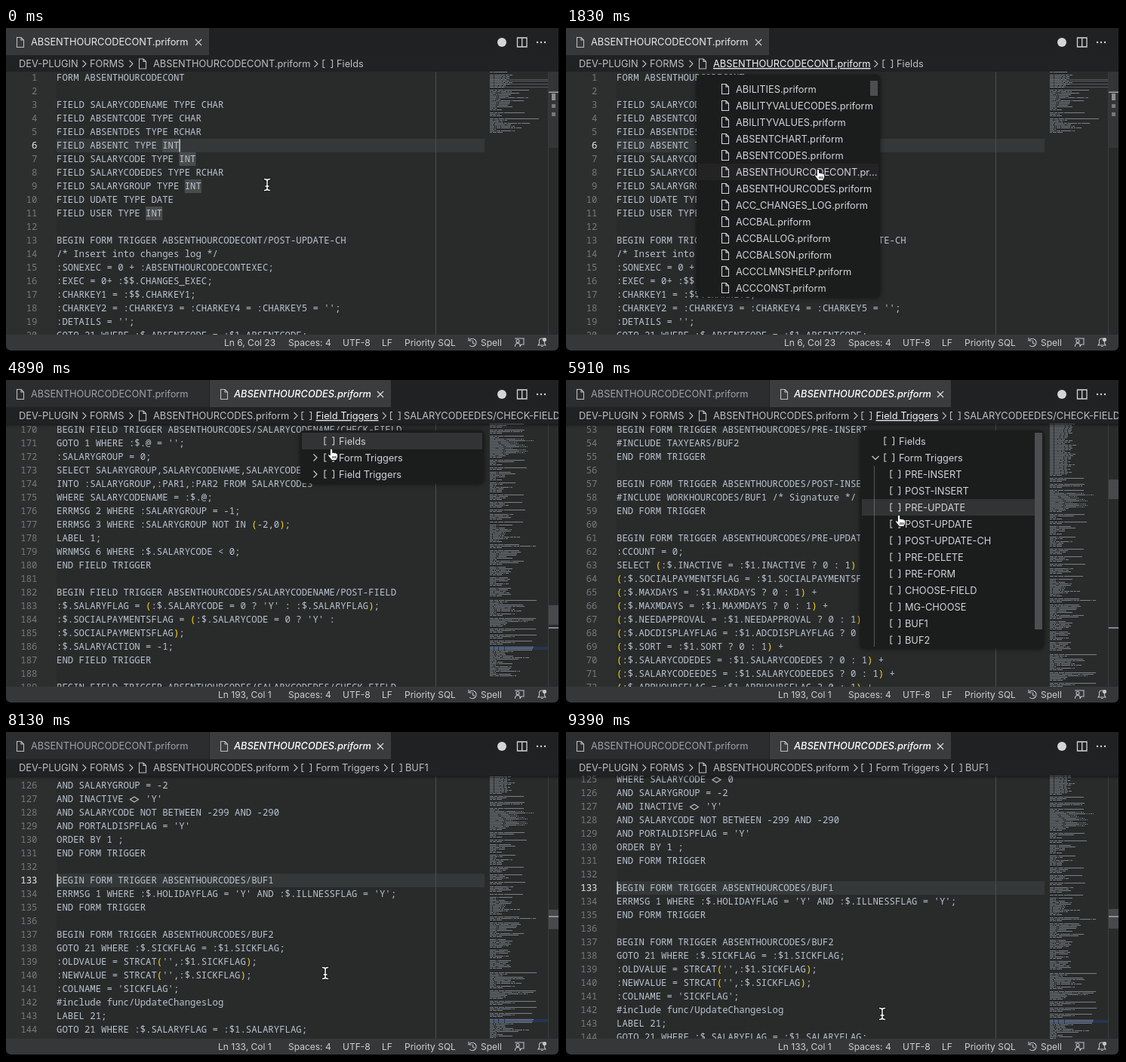
Write an HTML page that moves like this. It is 734x430 px and loops after 9420 ms.

```html
<!DOCTYPE html>
<html lang="en">
<head>
<meta charset="utf-8">
<title>Editor breadcrumbs</title>
<style>
html, body { margin: 0; width: 734px; height: 430px; overflow: hidden; background: #050606; }
svg { display: block; }
text { white-space: pre; }
.ui text { font-family: Inter, Roboto, sans-serif; font-size: 12.8px; fill: #bcbfc2; }
.ui .status text { font-size: 12px; fill: #cdd0d2; }
.ui .menu text { fill: #d2d4d6; }
.code text { font-family: "Noto Sans Mono", "DejaVu Sans Mono", monospace; font-size: 12.3px; font-weight: 500; fill: #b9c3d0; }
.code .num { font-weight: 400; fill: #757a7d; text-anchor: end; }
.code .on { fill: #d8dbdc; }
.line { fill: none; stroke: #bcbfc2; stroke-width: 1.1; }
.menu .line { stroke: #d2d4d6; }
</style>
</head>
<body>
<svg id="stage" width="734" height="430" viewBox="0 0 734 430" xmlns="http://www.w3.org/2000/svg"></svg>
<script>
const LOOP = 9420, CHAR = 7.38, ROW = 18, LEFT = 67;
const OPEN_FILES = 1150, OPEN_B = 2350, OPEN_SYMBOLS = 3750, EXPAND = 5250, PICK = 7000;

// ---------- documents ----------
const block = s => s.trim().split('\n');
const docA = block(`
FORM ABSENTHOURCODECONT

FIELD SALARYCODENAME TYPE CHAR
FIELD ABSENTCODE TYPE CHAR
FIELD ABSENTDES TYPE RCHAR
FIELD ABSENTC TYPE INT
FIELD SALARYCODE TYPE INT
FIELD SALARYCODEDES TYPE RCHAR
FIELD SALARYGROUP TYPE INT
FIELD UDATE TYPE DATE
FIELD USER TYPE INT

BEGIN FORM TRIGGER ABSENTHOURCODECONT/POST-UPDATE-CH
/* Insert into changes log */
:SONEXEC = 0 + :ABSENTHOURCODECONTEXEC;
:EXEC = 0+ :$$.CHANGES_EXEC;
:CHARKEY1 = :$$.CHARKEY1;
:CHARKEY2 = :CHARKEY3 = :CHARKEY4 = :CHARKEY5 = '';
:DETAILS = '';
GOTO 21 WHERE :$.ABSENTCODE = :$1.ABSENTCODE;
:OLDVALUE = :$1.ABSENTCODE;
:NEWVALUE = :$.ABSENTCODE;
:COLNAME = 'ABSENTCODE';
#include func/UpdateChangesLog
LABEL 21;
END FORM TRIGGER

BEGIN FORM TRIGGER ABSENTHOURCODECONT/PRE-FORM
:SONEXEC = 0;
END FORM TRIGGER

BEGIN FIELD TRIGGER ABSENTHOURCODECONT/SALARYCODENAME/CHECK-FIELD
GOTO 1 WHERE :$.@ = '';
:SALARYGROUP = 0;
SELECT SALARYGROUP INTO :SALARYGROUP FROM SALARYCODES
WHERE SALARYCODENAME = :$.@;
ERRMSG 2 WHERE :SALARYGROUP = -1;
ERRMSG 3 WHERE :SALARYGROUP NOT IN (-2,0);
LABEL 1;
WRNMSG 6 WHERE :$.SALARYCODE < 0;
END FIELD TRIGGER`);

const compareFields = ['SOCIALPAYMENTSFLAG', 'MAXDAYS', 'MAXMDAYS', 'NEEDAPPROVAL', 'ADCDISPLAYFLAG',
  'SORT', 'SALARYCODEDES', 'SALARYCODEEDES', 'APPHOURSFLAG'];
const triggers = ['PRE-INSERT', 'POST-INSERT', 'PRE-UPDATE', 'POST-UPDATE', 'POST-UPDATE-CH', 'PRE-DELETE',
  'PRE-FORM', 'CHOOSE-FIELD', 'MG-CHOOSE', 'BUF1', 'BUF2'];
const triggerLine = [53, 57, 61, 77, 82, 100, 105, 110, 118, 133, 137];

function makeDocB() {
  let seed = 7;
  const rand = n => (seed = seed * 16807 % 2147483647) % n;
  const doc = ['FORM ABSENTHOURCODES', ''];
  const put = (n, s) => block(s).forEach((l, i) => doc[n - 1 + i] = l);
  const any = () => compareFields[rand(compareFields.length)];
  for (let n = 3; n <= 50; n++) put(n, `FIELD ${any()} TYPE ${['INT', 'CHAR', 'RCHAR'][rand(3)]}`);
  for (let n = 51; n <= 226; n++) {
    const f = any();
    put(n, [`:NEWVALUE = :$.${f};`, `WHERE ${f} = :$.@`, `GOTO ${rand(30)} WHERE :$.${f} = 0;`,
      `:COLNAME = '${f}';`, 'LABEL 1;'][rand(5)]);
  }
  for (let n = 69; n <= 222; n += 7) { put(n, 'END FORM TRIGGER'); doc[n] = ''; }
  put(51, 'END FORM TRIGGER');
  triggers.forEach((name, i) => {
    const n = triggerLine[i];
    put(n - 2, 'END FORM TRIGGER');
    doc[n - 2] = '';
    put(n, 'BEGIN FORM TRIGGER ABSENTHOURCODES/' + name);
  });
  put(54, '#INCLUDE TAXYEARS/BUF2\nEND FORM TRIGGER');
  put(58, '#INCLUDE WORKHOURCODES/BUF1 /* Signature */\nEND FORM TRIGGER');
  put(62, ':CCOUNT = 0;\nSELECT (:$.INACTIVE = :$1.INACTIVE ? 0 : 1) +\n' +
    compareFields.map(f => `(:$.${f} = :$1.${f} ? 0 : 1) +`).join('\n'));
  put(125, `
WHERE SALARYCODE <> 0
AND SALARYGROUP = -2
AND INACTIVE <> 'Y'
AND SALARYCODE NOT BETWEEN -299 AND -290
AND PORTALDISPFLAG = 'Y'
ORDER BY 1 ;
END FORM TRIGGER

BEGIN FORM TRIGGER ABSENTHOURCODES/BUF1
ERRMSG 1 WHERE :$.HOLIDAYFLAG = 'Y' AND :$.ILLNESSFLAG = 'Y';
END FORM TRIGGER

BEGIN FORM TRIGGER ABSENTHOURCODES/BUF2
GOTO 21 WHERE :$.SICKFLAG = :$1.SICKFLAG;
:OLDVALUE = STRCAT('',:$1.SICKFLAG);
:NEWVALUE = STRCAT('',:$.SICKFLAG);
:COLNAME = 'SICKFLAG';
#include func/UpdateChangesLog
LABEL 21;
GOTO 21 WHERE :$.SALARYFLAG = :$1.SALARYFLAG;
:OLDVALUE = STRCAT('',:$1.SALARYFLAG);`);
  doc[168] = '';
  put(170, `
BEGIN FIELD TRIGGER ABSENTHOURCODES/SALARYCODENAME/CHECK-FIELD
GOTO 1 WHERE :$.@ = '';
:SALARYGROUP = 0;
SELECT SALARYGROUP,SALARYCODENAME,SALARYCODE
INTO :SALARYGROUP,:PAR1,:PAR2 FROM SALARYCODES
WHERE SALARYCODENAME = :$.@;
ERRMSG 2 WHERE :SALARYGROUP = -1;
ERRMSG 3 WHERE :SALARYGROUP NOT IN (-2,0);
LABEL 1;
WRNMSG 6 WHERE :$.SALARYCODE < 0;
END FIELD TRIGGER

BEGIN FIELD TRIGGER ABSENTHOURCODES/SALARYCODENAME/POST-FIELD
:$.SALARYFLAG = (:$.SALARYCODE = 0 ? 'Y' : :$.SALARYFLAG);
:$.SOCIALPAYMENTSFLAG = (:$.SALARYCODE = 0 ? 'Y' :
:$.SOCIALPAYMENTSFLAG);
:$.SALARYACTION = -1;
END FIELD TRIGGER

BEGIN FIELD TRIGGER ABSENTHOURCODES/SALARYCODEDES/CHECK-FIELD
WRNMSG 6 WHERE :$.SALARYCODE < 0;
END FIELD TRIGGER

BEGIN FIELD TRIGGER ABSENTHOURCODES/SALARYCODEEDES/CHECK-FIELD
WRNMSG 6 WHERE :$.SALARYCODE < 0;
END FIELD TRIGGER

BEGIN FIELD TRIGGER ABSENTHOURCODES/SICKFLAG/CHECK-FIELD
ERRMSG 5 WHERE :$.SALARYCODE < 0;
END FIELD TRIGGER

BEGIN FIELD TRIGGER ABSENTHOURCODES/SALARYFLAG/CHECK-FIELD`);
  put(205, 'BEGIN FIELD TRIGGER ABSENTHOURCODES/SALARYFLAG/POST-FIELD');
  put(209, `
BEGIN FIELD TRIGGER ABSENTHOURCODES/TASKCODE/CHECK-FIELD
GOTO 11 WHERE :$.TASKCODE = '';
:PAR1 = :$.TASKCODE;
ERRMSG 7 WHERE EXISTS
(SELECT 'X' FROM WORKHOURSTASKS
WHERE TASKCODE = :$.TASKCODE AND ABSENTFLAG <> 'Y');
#INCLUDE ABSENTHOURCODES/TASKCODE/BUF1
LABEL 11;
END FIELD TRIGGER`);
  return doc;
}
const docB = makeDocB();
const FOLDS = [201, 205];
const hidden = n => FOLDS.some(f => n > f && n < f + 4);

// ---------- drawing helpers ----------
const esc = s => s.replace(/&/g, '&amp;').replace(/</g, '&lt;');
const rect = (x, y, w, h, fill, extra = '') => `<rect x="${x}" y="${y}" width="${w}" height="${h}" fill="${fill}" ${extra}/>`;
const line = (d, extra = '') => `<path class="line" d="${d}" ${extra}/>`;
const label = (x, cy, s, extra = '') => `<text x="${x}" y="${cy + 4.6}" ${extra}>${esc(s)}</text>`;
const fileIcon = (x, cy) => line(`M${x + 1.5} ${cy - 6.5}h5.5l3.5 3.5v9.5h-9zM${x + 7} ${cy - 6.5}v3.5h3.5`);
const brackets = (x, cy) => line(`M${x + 3.5} ${cy - 5}h-2.5v10h2.5M${x + 11} ${cy - 5}h2.5v10h-2.5`);
const chevron = (x, cy) => line(`M${x - 2.5} ${cy - 4.5}l4.5 4.5-4.5 4.5`);
const cross = (x, cy, c) => line(`M${x - 4} ${cy - 4}l8 8m0-8l-8 8`, `style="stroke:${c}"`);
const group = (id, body, extra = '') => `<g id="${id}" ${extra}>${body}</g>`;

function codeLines(doc, folds) {
  let row = 0, out = '';
  doc.forEach((s, i) => {
    const n = i + 1;
    if (folds && hidden(n)) return;
    const cy = 66 + ROW * row++, y = cy + 4.4;
    if (folds && FOLDS.includes(n)) {
      const end = LEFT + s.length * CHAR + 2;
      out += rect(LEFT, cy - 9, 567, ROW, '#222b41') + chevron(56, cy) +
        line(`M${end} ${cy}h8`, 'stroke-dasharray="1.6 1.4"');
    }
    const at = s.indexOf('<>');
    if (at >= 0) out += line(`M${LEFT + at * CHAR + 1.5} ${cy + .5}l5.5-3.5 5.5 3.5-5.5 3.5z`);
    const body = esc(s.replace('<>', '  ')).replace(/[()]/g, '<tspan fill="#ffd80a">$&</tspan>');
    out += `<text class="num" x="41.5" y="${y}">${n}</text><text x="${LEFT}" y="${y}">${body}</text>`;
  });
  return out;
}

function miniMap(doc, folds) {
  let row = 0, d = '', blue = '';
  doc.forEach((s, i) => {
    if (folds && hidden(i + 1)) return;
    const y = 58.5 + 2 * row++;
    if (folds && FOLDS.includes(i + 1)) blue += rect(641, y - .5, 77, 2, '#243555');
    for (const m of s.matchAll(/\S+/g)) d += `M${641 + m.index} ${y}h${m[0].length}`;
  });
  return blue + `<path d="${d}" stroke="#acb5c0" stroke-width="1.1" opacity=".62"/>`;
}

function menu(id, x, y, w, h, rows, thumb) {
  return group(id, rect(x, y, w, h, '#1b1c1c', 'rx="5" filter="url(#shadow)"') +
    rect(x + 2, 70, w - 4, 22, '#313334', `id="${id}Hover"`) + rows +
    (thumb ? rect(...thumb, '#4c4e50') : ''), 'class="menu"');
}

const files = ['ABILITIES', 'ABILITYVALUECODES', 'ABILITYVALUES', 'ABSENTCHART', 'ABSENTCODES', 'ABSENTHOURCODECONT',
  'ABSENTHOURCODES', 'ACC_CHANGES_LOG', 'ACCBAL', 'ACCBALLOG', 'ACCBALSON', 'ACCCLMNSHELP', 'ACCCONST'];
const fileRows = files.map((f, i) => fileIcon(205, 81 + 22 * i) +
  label(225, 81 + 22 * i, f + (i == 5 ? '.pr...' : '.priform'))).join('');
const node = (x, cy, s) => brackets(x, cy) + label(x + 20, cy, s);
const topNodes = node(421, 81, 'Fields') + node(421, 103, 'Form Triggers');
const closedRows = topNodes + chevron(410, 103) + chevron(410, 125) + node(421, 125, 'Field Triggers');
const openRows = topNodes + line('M405.5 101l4.5 4.5 4.5-4.5') + line('M408.5 114v240', 'opacity=".3"') +
  triggers.map((s, i) => node(429, 125 + 22 * i, s)).join('');

const crumbSep = x => chevron(x, 47.5);
const NAME_A = 'ABSENTHOURCODECONT.priform', NAME_B = 'ABSENTHOURCODES.priform';
const white = 'style="fill:#e8eaeb"';

const stage = document.getElementById('stage');
stage.innerHTML = `
<defs>
  <clipPath id="win"><path d="M0 0H732V421q0 7-7 7H8q-8 0-8-8z"/></clipPath>
  <clipPath id="body"><rect y="58" width="732" height="349"/></clipPath>
  <filter id="shadow" x="-10%" y="-10%" width="120%" height="125%" color-interpolation-filters="sRGB"><feDropShadow dx="0" dy="1" stdDeviation="3" flood-opacity=".6"/></filter>
  <linearGradient id="fade" x2="0" y2="1"><stop stop-color="#000" stop-opacity=".4"/><stop offset="1" stop-color="#000" stop-opacity="0"/></linearGradient>
</defs>
<g clip-path="url(#win)">
  ${rect(0, 0, 732, 430, '#292b2b')}
  <g class="code" clip-path="url(#body)">
    ${rect(0, 58, LEFT, 349, '#2c2f2e')}
    ${rect(LEFT, 0, 567, ROW, '#353838', 'id="current"')}
    ${group('codeA', [[6, 19], [7, 22], [9, 23], [11, 16]].map(([n, c]) =>
      rect(LEFT + c * CHAR, 57 + ROW * (n - 1), 3 * CHAR, ROW, '#494c4d') +
      rect(641, 56 + 2 * n, 77, 1, '#55585a')).join('') + codeLines(docA))}
    ${group('codeB', codeLines(docB, true))}
    <text class="num on" id="currentNum" x="41.5"></text>
    ${rect(0, 0, 1.4, 17, '#d5d8da', 'id="caret"')}
    ${line('M569.5 58v349', 'style="stroke:#4a4d4d"')}
    ${group('mapA', miniMap(docA))}
    ${group('mapB', miniMap(docB, true))}
    ${line('M718.5 58v349', 'style="stroke:#393c3c"')}
    ${rect(719, 58, 13, 26, '#47494a', 'id="slider"')}
    ${group('marksA', rect(719, 84.5, 13, 1.5, '#a4a7a8') + rect(723, 87, 5, 9, '#8b8e8f') +
      rect(723, 101, 5, 5, '#77797a') + rect(723, 112, 5, 5, '#77797a'))}
    ${rect(719, 0, 13, 1.5, '#a4a7a8', 'id="mark"')}
    ${rect(0, 58, 732, 5, 'url(#fade)', 'id="topShade"')}
  </g>
  <g class="ui">
    ${rect(0, 0, 732, 36, '#202123')}${rect(0, 36, 732, 22, '#212223')}
    ${group('tabsA', rect(0, 0, 269, 36, '#36383a') + fileIcon(13, 19) + label(33, 18.5, NAME_A, white) + cross(255, 19, '#d6d8d9'))}
    ${group('tabsB', rect(0, 0, 269, 36, '#2b2d2f') + rect(270, 0, 240, 36, '#3a3c3e') + fileIcon(13, 19) + label(33, 18.5, NAME_A, 'opacity=".8"') +
      fileIcon(283, 19) + label(302, 18.5, NAME_B, 'style="fill:#fff;font-style:italic;font-weight:500"') + cross(496, 19, '#e0e2e3'))}
    <circle cx="657" cy="19" r="6" fill="#d3d5d6"/>
    ${line('M677.5 13h12.5v12h-12.5zM683.7 13v12', 'style="stroke:#d3d5d6;stroke-width:1.3"')}
    ${[704, 709, 714].map(x => `<circle cx="${x}" cy="19" r="1.2" fill="#d3d5d6"/>`).join('')}
    ${label(17, 47.5, 'DEV-PLUGIN')}${crumbSep(104)}${label(111, 47.5, 'FORMS')}${crumbSep(166)}${fileIcon(175, 47.5)}
    ${group('crumbA', label(195, 47.5, NAME_A, 'id="linkA"') + crumbSep(411) + brackets(419, 47.5) + label(438, 47.5, 'Fields'))}
    ${group('crumbB', label(195, 47.5, NAME_B) + crumbSep(384) + brackets(391, 47.5) + label(410.5, 47.5, '', 'id="linkB"') +
      group('leaf', crumbSep(0) + brackets(7, 47.5) + label(25.5, 47.5, '', 'id="leafText"')))}
    <g class="status">
      ${rect(0, 407, 732, 22, '#353739')}
      ${label(289, 417.5, '', 'id="position"')}${label(374, 417.5, 'Spaces: 4')}${label(446, 417.5, 'UTF-8')}
      ${label(498, 417.5, 'LF')}${label(528, 417.5, 'Priority SQL')}${label(629, 417.5, 'Spell')}
      ${line('M614 414a5.2 5.2 0 1 1 0 7M613 411v4h4M618.5 414.5v3.5l2.5 1.5')}
      ${line('M675 413v-1h11v8h-3l-2 2v-2M674.5 423c0-6 7-6 7 0')}<circle cx="678" cy="415.5" r="2" class="line"/>
      ${line('M705 421h10l-1.5-2v-3.5a3.5 3.5 0 0 0-7 0v3.5zM709 422.5h2.5')}<circle cx="713.5" cy="413.5" r="2.6" fill="#c3c6c8"/>
    </g>
    ${menu('fileMenu', 173, 62, 243, 295, fileRows, [403, 70, 10, 20])}
    ${menu('closedMenu', 390, 67, 243, 70, closedRows)}
    ${menu('openMenu', 390, 67, 243, 289, openRows, [621, 70, 10, 261])}
  </g>
</g>
<g id="ibeam" fill="none" stroke-linecap="round">
  ${['#111" stroke-width="3.4', '#fff" stroke-width="1.5'].map(s =>
    `<path stroke="${s}" d="M-3.5-7.5q3.5 0 3.5 2.5v10q0 2.5-3.5 2.5M3.5-7.5q-3.5 0-3.5 2.5v10q0 2.5 3.5 2.5M-2 2h4"/>`).join('')}
</g>
<g id="hand" stroke="#111" stroke-width=".9" stroke-linejoin="round">
  <path fill="#fff" d="M-1.6 1.200q1.600-2.200 3.200 0v4.300q1.300-1 2.600.4 1.300-.8 2.400.5 1.900-.4 1.900 1.600v2.500q0 2-1.500 3.500v1.500h-6.500q-1-2-2.800-3.500-1.500-2-2.200-3.500 1-1.700 2.900.3z"/>
  <path fill="none" d="M1.800 10v3M3.800 10v3M5.800 10v3"/>
</g>`;

// ---------- animation ----------
const el = Object.fromEntries([...stage.querySelectorAll('[id]')].map(e => [e.id, e]));
const set = (id, attrs) => { for (const k in attrs) el[id].setAttribute(k, attrs[k]); };
const show = (id, on) => set(id, { display: on ? 'inline' : 'none' });
const move = (id, x, y) => set(id, { transform: `translate(${x} ${y})` });

function track(t, keys) {
  const i = keys.findIndex(k => k[0] > t);
  if (i < 0) return keys[keys.length - 1].slice(1);
  if (i == 0) return keys[0].slice(1);
  const a = keys[i - 1], b = keys[i], u = (t - a[0]) / (b[0] - a[0]), e = u * u * (3 - 2 * u);
  return a.slice(1).map((v, j) => v + (b[j + 1] - v) * e);
}
const mousePath = [[0, 346, 208], [300, 346, 208], [900, 325, 48], [1200, 325, 48], [1800, 334, 187], [1900, 334, 187],
  [2200, 338, 211], [2400, 338, 211], [3270, 460, 79], [3550, 447, 48], [3850, 447, 48], [4500, 432, 92], [4890, 431, 91],
  [5120, 414, 102], [5320, 414, 102], [5850, 441, 179], [5950, 441, 179], [6700, 445, 321], [7050, 445, 321],
  [7700, 423, 320], [8200, 423, 320], [8900, 419, 374]];
const pickedY = [[7500, 210], [8000, 197], [8400, 197], [8900, 207]];
const lineAt = (n, y) => 66 + ROW * (n - 1) - y;

function draw(t) {
  const [mx, my] = track(t, mousePath);
  const isB = t >= OPEN_B, picked = t >= PICK;
  const filesOpen = t >= OPEN_FILES && !isB;
  const closedOpen = t >= OPEN_SYMBOLS && t < EXPAND, treeOpen = t >= EXPAND && !picked;
  const hover = Math.max(0, Math.min(12, Math.floor((my - 70) / 22)));

  let scroll = 0;
  if (picked) scroll = lineAt(133, track(t, pickedY)[0]);
  else if (treeOpen && hover > 1) scroll = lineAt(triggerLine[hover - 2], 210);
  else if (t >= OPEN_SYMBOLS) scroll = lineAt(170, 66);
  else if (isB) scroll = lineAt(193, 97);

  for (const id of ['codeA', 'mapA', 'tabsA', 'crumbA', 'marksA']) show(id, !isB);
  for (const id of ['codeB', 'mapB', 'tabsB', 'crumbB', 'mark', 'topShade']) show(id, isB);
  move('codeB', 0, -scroll);
  move('mapB', 0, -Math.round(scroll / ROW * .615));
  set('slider', { y: 58 + scroll / ROW * 1.425, height: isB ? 26 : 101, opacity: isB ? 1 : .35 });

  const current = picked ? 133 : isB ? 193 : 6;
  const cy = 66 + ROW * (current - 1) - scroll;
  set('current', { y: cy - 9 });
  set('currentNum', { y: cy + 4.4 });
  set('mark', { y: 58 + current * 1.4 });
  el.currentNum.textContent = current;
  set('caret', { x: isB ? LEFT + .5 : LEFT + 22 * CHAR, y: cy - 8.5 });
  const blink = picked ? (t - 8030 + 2000) % 1000 < 500 : t % 1000 < 500;
  show('caret', blink && (picked || t < OPEN_FILES));

  const linkA = !isB && my < 58 || filesOpen, linkB = isB && !picked && (my < 58 || t >= OPEN_SYMBOLS);
  const link = on => ({ 'text-decoration': on ? 'underline' : 'none', style: on ? 'fill:#f2f3f4' : '' });
  set('linkA', link(linkA));
  set('linkB', link(linkB));
  el.linkB.textContent = picked ? 'Form Triggers' : 'Field Triggers';
  el.leafText.textContent = picked ? 'BUF1' : 'SALARYCODEEDES/CHECK-FIELD';
  move('leaf', picked ? 503.5 : 501.5, 0);
  el.position.textContent = isB ? `Ln ${current}, Col 1` : 'Ln 6, Col 23';
  set('position', { x: isB ? 281 : 289 });

  show('fileMenu', filesOpen);
  show('closedMenu', closedOpen);
  show('openMenu', treeOpen);
  set('fileMenuHover', { y: 70 + 22 * hover, opacity: my > 70 ? .35 : 0 });
  set('closedMenuHover', { y: 70 + 22 * (my > 70 ? Math.min(hover, 2) : 2) });
  set('openMenuHover', { y: 70 + 22 * hover });

  const hand = my < 58 || filesOpen || closedOpen || treeOpen;
  show('hand', hand);
  show('ibeam', !hand);
  move('hand', mx, my);
  move('ibeam', mx, my);
}

const start = performance.now();
function tick() {
  draw((performance.now() - start) % LOOP);
  requestAnimationFrame(tick);
}
tick();
</script>
</body>
</html>
```
